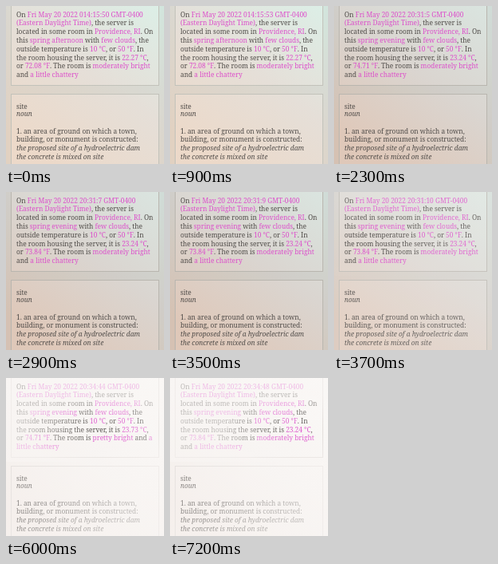
An HTML page with a canvas that plays this animation: 198x198 px, repeating every 7.3 s.

```html
<!DOCTYPE html>
<html lang="en">
<head>
<meta charset="utf-8">
<title>Site</title>
<style>
html, body { margin: 0; width: 100%; height: 100%; overflow: hidden; background: #d6d4cc; }
canvas { position: absolute; left: 0; top: 0; }
</style>
</head>
<body>
<script>
const SIZE = 198, LOOP = 7300;
const FONT = '8.35px "Noto Serif", serif';

// Sky colours run from the top right corner to the bottom left.
const scenes = [
  { start: 0, fade: 0, sky: ['#dcefe7', '#e5dfd8', '#ecd9c9'], edge: '#c2c2ba',
    clock: n => '014:15:' + (50 + n), part: 'afternoon' },
  { start: 1300, fade: 600, sky: ['#dae5e0', '#dad5d0', '#dfc8b9'], edge: '#b9b6af',
    clock: n => '20:31:' + (n - 2), part: 'evening' },
  { start: 3600, fade: 400, sky: ['#fbfaf8', '#f7f4f2', '#f3ece8'], edge: '#dfdad7',
    clock: n => '20:34:' + (n + 24), part: 'evening', fog: true }
];

for (const scene of scenes) {
  const canvas = document.createElement('canvas');
  canvas.width = canvas.height = SIZE;
  document.body.append(canvas);
  scene.ctx = canvas.getContext('2d');
}

const clamp = v => Math.min(1, Math.max(0, v));
const between = (t, a, b) => t >= a && t < b;

// Asterisks switch between body and accent colour.
function writeLine(ctx, line, y, italic) {
  ctx.font = (italic ? 'italic ' : '') + FONT;
  let x = 13;
  line.split('*').forEach((part, i) => {
    ctx.fillStyle = i % 2 ? '#dc4fcb' : '#504c49';
    ctx.fillText(part, x, y);
    x += ctx.measureText(part).width;
  });
}

function report(scene, index, t) {
  const first = index === 0;
  const celsius = first ? '22.27' : between(t, 2200, 4000) || t >= 6500 ? '23.24' : '23.73';
  const fahrenheit = first ? '72.08' : between(t, 2100, 2900) || between(t, 5000, 6500) ? '74.71' : '73.84';
  const pretty = !first && (t < 2000 || between(t, 4000, 6600));
  return [
    `On *Fri May 20 2022 ${scene.clock(Math.floor(t / 300))} GMT-0400`,
    '*(Eastern Daylight Time)*, the server is',
    'located in some room in *Providence, RI*. On',
    `this *spring ${scene.part}* with *few clouds*, the`,
    'outside temperature is *10 °C*, or *50 °F*. In',
    `the room housing the server, it is *${celsius} °C*,`,
    `or *${fahrenheit} °F*. The room is *${pretty ? 'pretty bright* and *a' : 'moderately bright'}`,
    pretty ? '*little chattery' : 'and *a little chattery'
  ];
}

function drawFog(ctx, t) {
  const tint = a => `rgba(249,246,244,${a})`;
  ctx.save();
  ctx.translate(55 + (t - 4300) * 0.037, 66);
  ctx.scale(2.1, 1);
  const spot = ctx.createRadialGradient(0, 0, 0, 0, 0, 46);
  spot.addColorStop(0, tint(0));
  spot.addColorStop(0.45, tint(0.25));
  spot.addColorStop(1, tint(0.65));
  ctx.fillStyle = spot;
  ctx.fillRect(-SIZE, -66, 2 * SIZE, 105);
  ctx.restore();

  const low = ctx.createLinearGradient(0, 105, 130, SIZE);
  low.addColorStop(0, tint(0.25));
  low.addColorStop(1, tint(0.65));
  ctx.fillStyle = low;
  ctx.fillRect(0, 105, SIZE, 93);
}

function drawScene(scene, index, t) {
  const { ctx, sky } = scene;
  const light = ctx.createLinearGradient(SIZE, 0, 60, SIZE);
  sky.forEach((color, i) => light.addColorStop(i / 2, color));
  ctx.fillStyle = light;
  ctx.fillRect(0, 0, SIZE, SIZE);
  if (!scene.fog) {
    ctx.fillStyle = 'rgba(90,110,100,0.08)';
    ctx.fillRect(0, 0, SIZE, SIZE);
  }
  for (const [y, h] of [[-5, 105], [110, 100]]) {
    ctx.fillStyle = light;
    ctx.fillRect(6, y, 186, h);
    ctx.strokeStyle = scene.edge;
    ctx.strokeRect(6.5, y + 0.5, 185, h - 1);
  }
  report(scene, index, t).forEach((line, i) => writeLine(ctx, line, 13.5 + i * 10.8));
  writeLine(ctx, 'site', 129);
  writeLine(ctx, 'noun', 138, true);
  writeLine(ctx, '1. an area of ground on which a town,', 159.5);
  writeLine(ctx, 'building, or monument is constructed:', 170);
  writeLine(ctx, 'the proposed site of a hydroelectric dam', 181, true);
  writeLine(ctx, 'the concrete is mixed on site', 191.5, true);
  if (scene.fog) drawFog(ctx, t);
}

function render(now) {
  const t = now % LOOP;
  scenes.forEach((scene, i) => {
    const alpha = scene.fade ? clamp((t - scene.start) / scene.fade) : 1;
    scene.ctx.canvas.style.opacity = alpha;
    if (alpha) drawScene(scene, i, t);
  });
  requestAnimationFrame(render);
}
render(performance.now());
</script>
</body>
</html>
```
